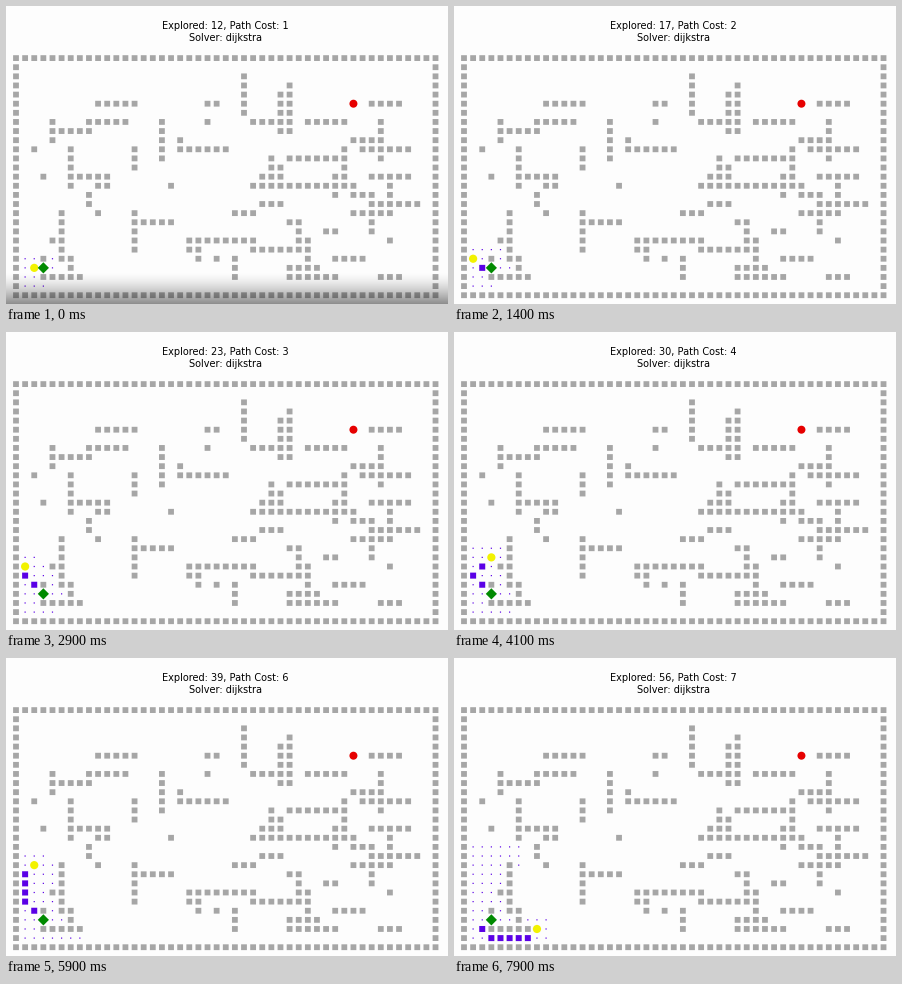
Animation of 442x298 px, one loop 8 s. Source, as a matplotlib script:

```python
import matplotlib.pyplot as plt
import numpy as np
from itertools import product
from matplotlib.animation import FuncAnimation
from matplotlib.collections import PolyCollection
from matplotlib.patches import Circle

W, H, DPI = 442, 298, 100
COLS, ROWS = 47, 27
X0, Y0, CELL = 10.0, 52.1, 9.12
START, GOAL = (3, 3), (37, 21)
INTERVAL, LOOP = 100, 8000

BACK, GRAY, PURPLE = "#fdfdfd", "#a6a6a6", "#5a00e6"

# Wall runs, rows counted from the top
ACROSS = {
    5: "9-13 21-22 39-42", 7: "8-12 21 26-30 32-36", 8: "4-8", 9: "37-40",
    10: "2 18-23 38-43", 11: "30-36 40", 13: "3 6-10 27 39-43",
    14: "9-10 17 26-37", 15: "37-39", 16: "27-29 39-44",
    17: "9 24-26 37-41", 18: "13-17 30-31", 19: "34-35", 20: "4 19-26 41",
    21: "26-32", 22: "3 22 35-38", 23: "30-33", 24: "3-7 30-35 40-42",
}
DOWN = {
    4: "7-9", 5: "17-22", 6: "10-14 22-24", 8: "15-16", 13: "10-12 17-21",
    16: "7-11", 18: "9-10", 19: "20-21", 20: "20-22", 24: "22-24",
    25: "2-6", 28: "11-14", 29: "4-8 12-14", 30: "3-8", 31: "18-21",
    32: "20-22", 35: "13-15", 36: "10-13", 39: "15-19", 40: "7-9",
    41: "13-17",
}


def expand(runs):
    for run in runs.split():
        ends = [int(n) for n in run.split("-")]
        yield from range(ends[0], ends[-1] + 1)


def build_walls():
    top = ROWS - 1
    walls = {(x, y) for x, y in product(range(COLS), range(ROWS))
             if x in (0, COLS - 1) or y in (0, top)}
    walls |= {(c, top - r) for r, runs in ACROSS.items() for c in expand(runs)}
    walls |= {(c, top - r) for c, runs in DOWN.items() for r in expand(runs)}
    return walls


def search(walls, steps):
    """Dijkstra on an 8-connected grid; returns one snapshot per expansion."""
    parent, cost = {START: None}, {START: 0}
    frontier, states = {(0, START)}, []
    for _ in range(steps):
        item = min(frontier)
        frontier.remove(item)
        dist, node = item
        for dx, dy in product((-1, 0, 1), repeat=2):
            nxt = (node[0] + dx, node[1] + dy)
            if nxt not in walls and nxt not in cost:
                cost[nxt], parent[nxt] = dist + 1, node
                frontier.add((dist + 1, nxt))
        path, p = [], parent[node]
        while p is not None and p != START:
            path.append(p)
            p = parent[p]
        states.append((node, dist, path, list(cost)))
    return states


def step_at(t):
    """Search step on screen at t ms; the display skips some steps."""
    if t < 1700:
        return min(2 + t // 200, 9)
    if t < 2500:
        return 11 + (t >= 2000) + (t >= 2200)
    n = 15 + (t - 2500) // 200
    return n - 1 if n > 15 and n % 5 == 0 else n


def centre(cell):
    return X0 + CELL * cell[0], Y0 + CELL * (ROWS - 1 - cell[1])


def squares(cells, half):
    corners = half * np.array([(-1, -1), (1, -1), (1, 1), (-1, 1)])
    return [corners + centre(c) for c in cells]


def add_polys(verts, color, z):
    polys = PolyCollection(verts, facecolors=color, linewidths=0, zorder=z)
    polys.set_snap(False)
    return ax.add_collection(polys, autolim=False)


def add_disc(cell, radius, color):
    return ax.add_patch(Circle(centre(cell), radius, fc=color, lw=0, zorder=4))


def add_line(baseline, text=""):
    return fig.text(219.5 / W, 1 - baseline / H, text, ha="center",
                    va="baseline", fontsize=7, family="DejaVu Sans")


fig = plt.figure(figsize=(W / DPI, H / DPI), dpi=DPI, facecolor=BACK)
ax = fig.add_axes([0, 0, 1, 1])

# Dark strip along the bottom that fades away
SHADE = 32
shade_px = np.zeros((SHADE, 1, 4))
shade_px[:, 0, 3] = 0.45 * ((np.arange(SHADE) + 0.5) / SHADE) ** 1.5
shade = ax.imshow(shade_px, extent=(0, W, H, H - SHADE), aspect="auto",
                  interpolation="nearest", zorder=6)
ax.set(xlim=(0, W), ylim=(H, 0))
ax.axis("off")

walls = build_walls()
states = search(walls, step_at(LOOP - INTERVAL) + 1)

add_polys(squares(walls, 2.9), GRAY, 1)
dots = add_polys([], PURPLE, 2)
trail = add_polys([], PURPLE, 3)
diamond = 5.6 * np.array([(0, -1), (1, 0), (0, 1), (-1, 0)])
add_polys([diamond + centre(START)], "#008a00", 5)
add_disc(GOAL, 4.0, "#e60000")
head = add_disc(START, 4.1, "#f2f200")

title = add_line(23)
add_line(35, "Solver: dijkstra")


def update(i):
    t = i * INTERVAL
    node, cost, path, seen = states[step_at(t)]
    dots.set_verts(squares(seen, 0.6))
    trail.set_verts(squares(path, 3.0))
    head.center = centre(node)
    title.set_text(f"Explored: {len(seen)}, Path Cost: {cost}")
    shade.set_alpha(float(np.clip((700 - t) / 600, 0, 1)))
    return dots, trail, head, title, shade


anim = FuncAnimation(fig, update, frames=LOOP // INTERVAL, interval=INTERVAL,
                     init_func=lambda: update(0), repeat=True, repeat_delay=0,
                     blit=False)
plt.show()
```
